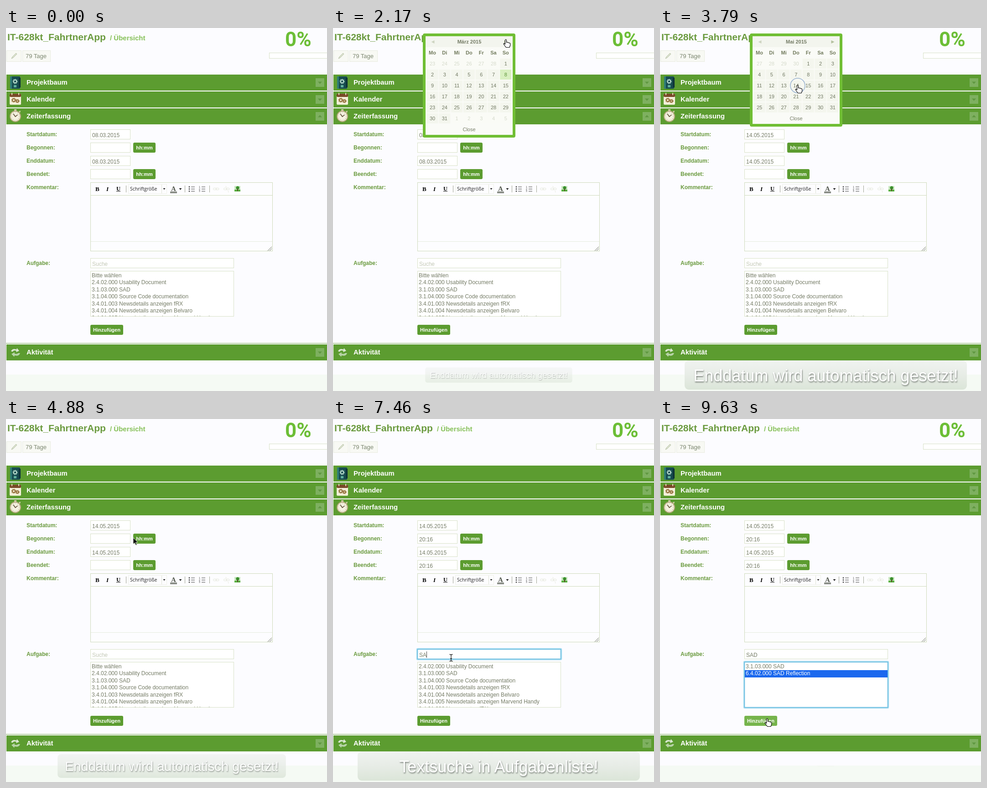
An HTML page that plays this animation: 704 by 795 pixels, repeating every 9.68 s.

```html
<!DOCTYPE html>
<html lang="de">
<head>
<meta charset="utf-8">
<title>Zeiterfassung</title>
<style>
html, body { margin: 0; width: 100%; height: 100%; overflow: hidden; background: #fcfcff; }
svg { display: block; width: 704px; height: 795px; font-family: "Liberation Sans", Arial, sans-serif; }
text { white-space: pre; }
.note text { filter: drop-shadow(1px 2px 1.5px rgba(70, 75, 70, .7)); }
</style>
</head>
<body>
<svg id="stage" viewBox="0 0 704 795">
  <defs>
    <linearGradient id="glass" x1="0" y1="0" x2="0" y2="1">
      <stop offset="0" stop-color="#f0f3f0"/>
      <stop offset=".5" stop-color="#e7ece6"/>
      <stop offset="1" stop-color="#dbe5d8"/>
    </linearGradient>
    <clipPath id="listClip"><rect x="186" y="533" width="313" height="98"/></clipPath>
  </defs>
</svg>
<script>
const LOOP = 9680;
const GREEN = '#5c9c30', LABEL = '#6a9a3e', TEXT = '#757c66', LINE = '#d9e2c8';
const stage = document.getElementById('stage');

function el(tag, attrs = {}, parent = stage) {
  const node = document.createElementNS('http://www.w3.org/2000/svg', tag);
  for (const k in attrs) node.setAttribute(k, attrs[k]);
  parent.appendChild(node);
  return node;
}
const group = (parent = stage, attrs = {}) => el('g', attrs, parent);
const rect = (x, y, width, height, fill, more = {}, parent = stage) =>
  el('rect', { x, y, width, height, fill, ...more }, parent);
const path = (d, fill, more = {}, parent = stage) => el('path', { d, fill, ...more }, parent);
const circle = (cx, cy, r, fill, more = {}, parent = stage) =>
  el('circle', { cx, cy, r, fill, ...more }, parent);
function label(x, y, str, size, fill, more = {}, parent = stage) {
  const node = el('text', { x, y, 'font-size': size, fill, ...more }, parent);
  node.textContent = str;
  return node;
}
const BOLD = { 'font-weight': 700 };
const MID = { 'text-anchor': 'middle' };
const show = (node, on) => node.setAttribute('display', on ? 'inline' : 'none');
const clamp = v => Math.max(0, Math.min(1, v));
const ramp = (t, a, b) => clamp((t - a) / (b - a));

// Page background and heading
rect(0, 0, 704, 795, '#fcfcff');
rect(0, 759, 704, 36, '#f5faf4');
label(3, 27, 'IT-628kt_FahrtnerApp', 21, LABEL, BOLD);
label(228, 27, '/ Übersicht', 15, '#86c058', BOLD);
label(612, 40, '0%', 44, '#6cbe36', { ...BOLD, 'font-family': 'Roboto, sans-serif' });
rect(577.5, 54.5, 140, 12, '#fff', { stroke: LINE });
for (const [x, w] of [[1.5, 32], [36.5, 61]])
  rect(x, 49.5, w, 24, '#f8f9f4', { stroke: '#e8ebdf' });
path('M12 67l2-4 8-8 2 2-8 8z', '#dde4d0', { stroke: '#a9b498', 'stroke-width': .8 });
label(43, 66, '79 Tage', 13, '#7c8770');

// Accordion bars
function bar(y, title, open) {
  rect(1, y, 703, 35, GREEN);
  label(45, y + 22, title, 14.8, '#fff', BOLD);
  rect(679, y + 8, 19, 19, '#7eb060');
  const m = y + 17.5;
  path(open ? `M684 ${m + 2}h9l-4.5-5z` : `M684 ${m - 2}h9l-4.5 5z`, '#5f9840');
}
bar(102, 'Projektbaum');
bar(139, 'Kalender');
bar(176, 'Zeiterfassung', true);
rect(0, 690, 704, 1, '#7cac54');
bar(693, 'Aktivität');

function gear(x, y, r, color) {
  circle(x, y, r, 'none', { stroke: color, 'stroke-width': 2 });
  circle(x, y, r + 1.6, 'none', { stroke: color, 'stroke-width': 1.4, 'stroke-dasharray': '1.8 1.8' });
}
rect(9, 106, 22, 27, '#174c50', { rx: 2 });
rect(9, 106, 4, 27, '#2f7c78', { rx: 1 });
rect(28, 109, 4, 21, '#0f3538');
gear(20, 117, 3.2, '#b8dccc');
rect(17, 125, 6, 5, '#5fae9a');

rect(8, 144, 25, 24, '#f3efd8', { rx: 2 });
rect(8, 144, 25, 7, '#7a4a28', { rx: 2 });
for (const x of [12, 27]) rect(x, 142, 2, 5, '#ded8b8');
gear(17, 158, 3, '#94703a');
gear(25, 160, 2.2, '#94703a');

rect(18, 178, 5, 4, '#d8cfb0');
path('M28 183l3 -2 1 2 -2 3z', '#d8cfb0');
circle(20.5, 193.5, 11.5, '#f6f2e0', { stroke: '#b5a87c', 'stroke-width': 2 });
circle(20.5, 193.5, 8.5, 'none', { stroke: '#9b8c68', 'stroke-width': 1.2, 'stroke-dasharray': '1 3.45' });
path('M16 188l4.5 6 5 -4', 'none', { stroke: '#5b4a32', 'stroke-width': 1.6 });

path('M11 708q3-7 12-4l1-3 5 6-7 3 .6-3q-6-2-8 2z', '#d9e8d0');
path('M31 712q-3 8-12 5l-1 3-6-6 7-4-.4 3q6 2 8-1z', '#b8d4a8');

// Form
const rows = [['Startdatum:', 222], ['Begonnen:', 251], ['Enddatum:', 280], ['Beendet:', 309]];
const fields = rows.map(([name, y]) => {
  label(45, y + 15, name, 12, LABEL, BOLD);
  rect(185.5, y + .5, 87, 21, '#fff', { stroke: LINE });
  return label(189, y + 17, '', 12, TEXT);
});
function button(x, y, w, str) {
  const box = rect(x, y, w, 22, GREEN, { rx: 3 });
  label(x + w / 2, y + 15, str, 11, '#fff', { ...BOLD, ...MID });
  return { box, x, y, w };
}
const buttons = [button(279, 251, 49, 'hh:mm'), button(279, 309, 49, 'hh:mm'), button(185, 650, 72, 'Hinzufügen')];
label(45, 353, 'Kommentar:', 12, LABEL, BOLD);
label(45, 519, 'Aufgabe:', 12, LABEL, BOLD);

// Comment editor
rect(185.5, 338.5, 399, 150, '#fdfdff', { stroke: '#cfdbbc' });
rect(186, 366, 398, 1, '#cfdbbc');
rect(186, 467, 398, 1, '#e6ebde');
path('M574 488l9-9M578 488l5-5', 'none', { stroke: '#6b7060' });
const serif = { 'font-family': '"Liberation Serif", Times, serif', 'font-weight': 700 };
label(196, 357, 'B', 13, '#000', serif);
label(220, 357, 'I', 13, '#000', { ...serif, 'font-style': 'italic' });
label(242, 356, 'U', 12.5, '#000', serif);
rect(242, 357, 9, 1, '#000');
for (const x of [263, 392, 446]) rect(x, 345, 1, 15, '#a0a494');
rect(268.5, 342.5, 84, 20, 'none', { stroke: '#eef0e8' });
rect(341, 343, 1, 19, '#dfe3d4');
label(272, 356, 'Schriftgröße', 10.4, '#222', { 'font-family': '"Open Sans", sans-serif' });
path('M344.5 351h5l-2.5 3z', '#111');
label(362, 357, 'A', 15, '#555a50', serif);
rect(360, 358, 15, 4, '#8b8f88');
path('M379.5 351h6l-3 3.5z', '#111');
for (let i = 0; i < 3; i++) {
  const y = 348 + i * 4.7;
  circle(402, y, 1.4, '#444');
  rect(406, y - .5, 8, 1, '#444');
  label(423, y + 2, i + 1, 5, '#333');
  rect(429, y - .5, 8, 1, '#444');
}
const faint = { stroke: '#e4e7da' };
for (const x of [454, 477]) {
  rect(x + .5, 350.5, 7, 4, 'none', { ...faint, rx: 2 });
  rect(x + 6, 350.5, 7, 4, 'none', { ...faint, rx: 2 });
}
path('M482 346l1 3M487 357l1 3', 'none', faint);
rect(501, 346, 13, 12, '#c9e8c0');
rect(501, 354, 13, 4, '#58b040');
circle(508, 350, 3.6, '#3a8f2c');
rect(507, 352, 2, 5, '#5c4428');

// Search field and task list
rect(185.5, 504.5, 314, 21, '#fff', { stroke: LINE });
rect(185.5, 532.5, 314, 99, '#fff', { stroke: LINE });
function glow(y, h) {
  const g = group();
  rect(184, y - 1, 317, h + 2, 'none', { stroke: '#a8dcf0', 'stroke-width': 2.5, rx: 2 }, g);
  rect(185.5, y + .5, 314, h - 1, 'none', { stroke: '#5cb6dc', 'stroke-width': 1.4 }, g);
  return g;
}
const searchGlow = glow(504, 22), listGlow = glow(532, 100);
const query = label(189, 521, '', 12, TEXT);
const caret = rect(0, 509, 1, 14, '#444');

const tasks = [
  'Bitte wählen', '2.4.02.000 Usability Document', '3.1.03.000 SAD',
  '3.1.04.000 Source Code documentation', '3.4.01.003 Newsdetails anzeigen fRX',
  '3.4.01.004 Newsdetails anzeigen Belvaro', '3.4.01.005 Newsdetails anzeigen Marvend Handy',
  '3.4.01.006 News posten fRX'
];
const hits = ['3.1.03.000 SAD', '6.4.02.000 SAD Reflection'];
const list = group(stage, { 'clip-path': 'url(#listClip)' });
const picked = rect(186, 550, 313, 16, '#1b68ee', {}, list);
const lines = Array.from({ length: 7 }, (_, i) => label(188, 546 + i * 15.45, '', 12, TEXT, {}, list));

// Date picker
const picker = group();
const colX = i => 218 + i * 26.8;
function month(name, lead, prevLen, len) {
  const g = group(picker), weeks = Math.ceil((lead + len) / 7), h = 84 + weeks * 24;
  const text = (x, y, s, fill, more) => label(x, y, s, 11, fill, { ...MID, ...more }, g);
  rect(197, 12, 203, h, '#70be34', { rx: 4 }, g);
  rect(203, 18, 191, h - 12, '#fafbf7', {}, g);
  rect(203, 18, 191, 24, '#f3f5ee', {}, g);
  path('M222.5 27v7l-7-3.5z', '#cdd4c0', {}, g);
  path('M375.5 27v7l7-3.5z', '#b2bf9c', {}, g);
  text(299, 34, name, '#757c66', BOLD);
  ['Mo', 'Di', 'Mi', 'Do', 'Fr', 'Sa', 'So'].forEach((d, i) => text(colX(i), 58, d, '#717a5c', BOLD));
  for (let i = 0; i < weeks * 7; i++) {
    const n = i - lead + 1, own = n > 0 && n <= len;
    const x = colX(i % 7), y = 78 + 24 * Math.floor(i / 7);
    const today = own && n === 8 && lead === 6;
    rect(x - 12.5, y - 11, 25, 22, today ? '#d8efc0' : own ? '#f4f6ee' : '#fafbf6', {}, g);
    text(x, y + 4, own ? n : n < 1 ? n + prevLen : n - len, today ? '#5c9438' : own ? '#6f7760' : '#d5dacb');
  }
  text(298.5, h - 2, 'Close', '#757c66');
  return g;
}
const months = [month('März 2015', 6, 28, 31), month('April 2015', 2, 31, 30), month('Mai 2015', 4, 30, 31)];

// Captions grow in and shrink out over one second
function note(str, inAt, outAt) {
  const g = group(stage, { class: 'note' });
  rect(-309.5, -32, 619, 64, 'url(#glass)', { rx: 9 }, g);
  label(0, 14, str, 36, '#fff', MID, g);
  return t => {
    const k = Math.min(ramp(t, inAt, inAt + 1000), 1 - ramp(t, outAt, outAt + 1000));
    show(g, k > .01);
    g.setAttribute('transform', `translate(363.5 760) scale(${k})`);
    g.setAttribute('opacity', k);
  };
}
const notes = [
  note('Enddatum wird automatisch gesetzt!', 1650, 4690),
  note('Textsuche in Aufgabenliste!', 5950, 8690)
];

// Pointer
const ring = circle(0, 0, 1, 'none', { stroke: '#4a78b8', 'stroke-width': 1.5 });
const pointer = group();
const ink = { stroke: '#000', 'stroke-width': 1.1, 'stroke-linejoin': 'round' };
const shapes = {
  arrow: path('M0 0v14l3.3-3 2.5 5.5 2.2-1-2.5-5.3h4.5z', '#000', { stroke: '#fff', 'stroke-width': .8 }, pointer),
  hand: path('M-1.5 1.5q1.5-3 3 0v5q2-1.2 2.8.6 2-1 2.8.8 2.4-.6 2.6 1.5v3.6l-1.7 4.5h-7.5l-4.8-6.5q-1.5-2.5.6-2.3l2.2 1.8z', '#fff', ink, pointer),
  beam: path('M-3.5-7.5q3 0 3.5 1.5q.5-1.5 3.5-1.5M0-6v12M-3.5 7.5q3 0 3.5-1.5q.5 1.5 3.5 1.5M-2 2h4', 'none', { stroke: '#222', 'stroke-width': 1.3 }, pointer)
};
const route = [
  [200, 720, 300], [900, 232, 236], [1300, 232, 236], [1900, 379, 25], [2900, 379, 25],
  [3400, 302, 125], [4150, 302, 125], [4880, 279, 260], [5080, 292, 259], [5350, 292, 259],
  [5620, 296, 318], [5980, 296, 318], [6600, 259, 523], [8000, 259, 523], [8450, 262, 558],
  [8800, 262, 558], [9350, 235, 656], [LOOP, 235, 656]
];
const clicks = [960, 2260, 2700, 3650, 5150, 5770, 6680, 8550];

function place(t) {
  if (t <= route[0][0]) return route[0].slice(1);
  const i = route.findIndex(p => p[0] >= t), [t0, x0, y0] = route[i - 1], [t1, x1, y1] = route[i];
  const k = ramp(t, t0, t1), e = k * k * (3 - 2 * k);
  return [x0 + (x1 - x0) * e, y0 + (y1 - y0) * e];
}

function draw(t) {
  const date = t < 3660 ? '08.03.2015' : '14.05.2015';
  fields[0].textContent = fields[2].textContent = date;
  fields[1].textContent = t < 5190 ? '' : '20:16';
  fields[3].textContent = t < 5810 ? '' : '20:16';

  const typed = 'SAD'.slice(0, [7150, 7360, 7600].filter(at => t >= at).length);
  const typing = t >= 6700 && t < 8550;
  query.textContent = typed || 'Suche';
  query.setAttribute('fill', typed ? TEXT : '#c3c8b6');
  show(searchGlow, typing);
  show(listGlow, t >= 8550);
  show(caret, typing && (t - 6700) % 1000 < 800);
  caret.setAttribute('x', 189 + [0, 8, 16, 25][typed.length]);

  const chosen = t >= 8560;
  const items = t >= 7760 ? hits : typed ? tasks.slice(1) : tasks;
  lines.forEach((l, i) => {
    l.textContent = items[i] || '';
    l.setAttribute('fill', chosen && i === 1 ? '#fff' : TEXT);
  });
  show(picked, chosen);

  const fade = Math.min(ramp(t, 1060, 1260), 1 - ramp(t, 3920, 4140));
  show(picker, fade > 0);
  picker.setAttribute('opacity', fade);
  const current = t < 2300 ? 0 : t < 2740 ? 1 : 2;
  months.forEach((m, i) => show(m, i === current));
  notes.forEach(n => n(t));

  const [x, y] = place(t);
  let over = false;
  for (const b of buttons) {
    const hit = x > b.x + 1 && x < b.x + b.w && y > b.y && y < b.y + 22;
    b.box.setAttribute('fill', hit ? '#76b44c' : GREEN);
    over = over || hit;
  }
  const beam = (t > 800 && t < 1400) || (t > 6480 && t < 8150);
  const onPicker = fade > 0 && x > 203 && x < 394 && y > 18 && y < 210;
  const kind = beam ? 'beam' : over || onPicker ? 'hand' : 'arrow';
  for (const k in shapes) show(shapes[k], k === kind);
  show(pointer, t > 200);
  pointer.setAttribute('transform', `translate(${x} ${y})`);

  const age = t - clicks.filter(c => c <= t).pop();
  show(ring, age < 300);
  if (age < 300) {
    ring.setAttribute('cx', x);
    ring.setAttribute('cy', y + 1);
    ring.setAttribute('r', age * .114);
    ring.setAttribute('opacity', 1 - age / 300);
  }
}

function tick() {
  draw(performance.now() % LOOP);
  requestAnimationFrame(tick);
}
tick();
</script>
</body>
</html>
```
